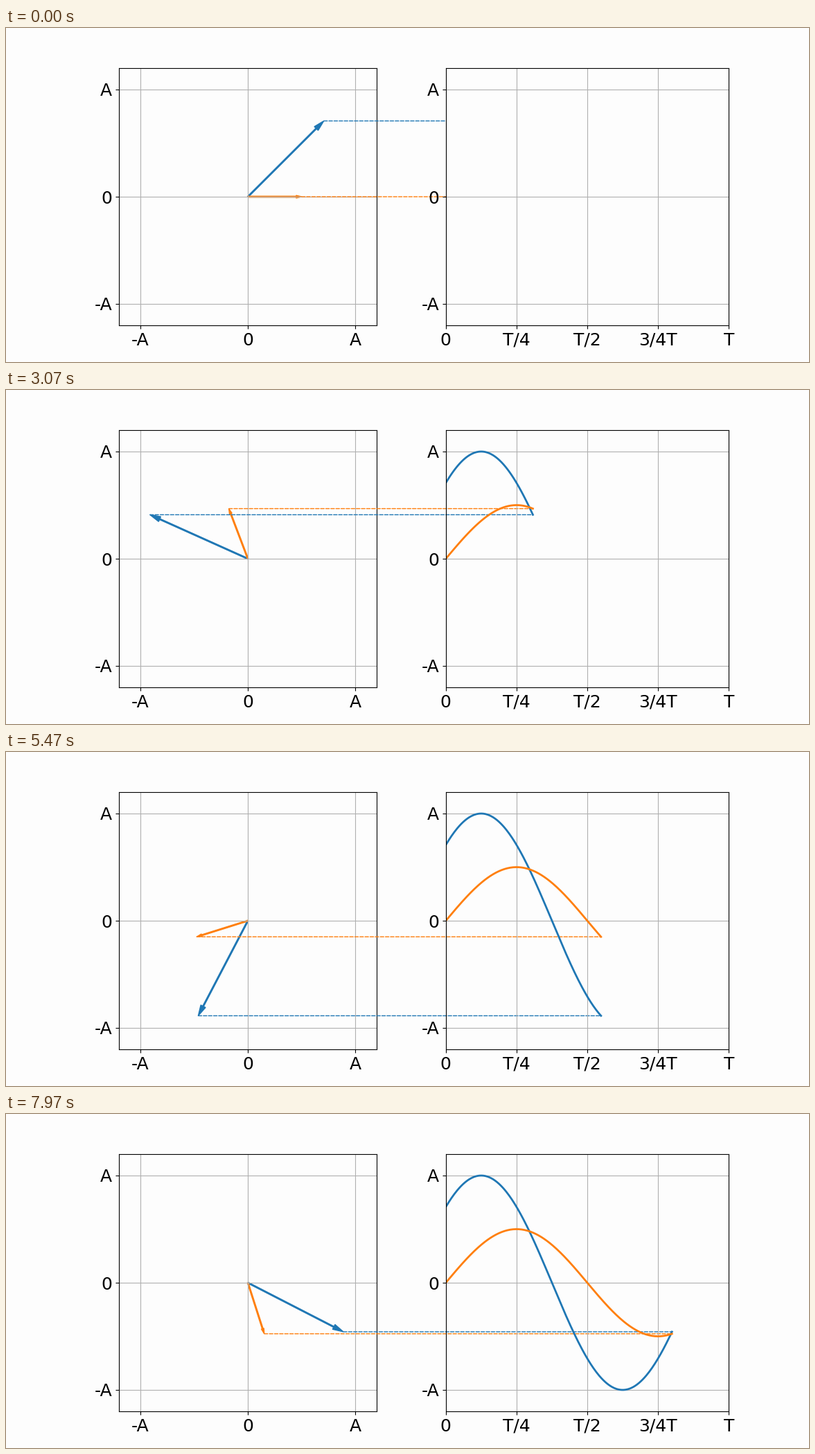
Write a matplotlib script that moves like this. It is 1159 px wide and 483 px high and loops after 8 s.

```python
import numpy as np
import matplotlib.pyplot as plt
from matplotlib.animation import FuncAnimation
from matplotlib.patches import ConnectionPatch

W, H, DPI = 1159, 483, 100
LOOP_MS, FRAMES = 8000, 240
STEPS = 300           # samples in one full period
AMP = 4.0
LIMIT = 1.2 * AMP
PAPER = "#fdfdfd"

plt.rcParams.update({"font.family": "DejaVu Sans", "font.size": 18})
fig = plt.figure(figsize=(W / DPI, H / DPI), dpi=DPI, facecolor=PAPER)


def make_axes(left, right, top=58, bottom=430):
    """Gridded axes placed by pixel edges, y counted from the top."""
    ax = fig.add_axes([left / W, 1 - bottom / H,
                       (right - left) / W, (bottom - top) / H],
                      facecolor=PAPER)
    ax.set_ylim(-LIMIT, LIMIT)
    ax.set_yticks([-AMP, 0, AMP], ["-A", "0", "A"])
    ax.grid(True)
    return ax


phase_ax = make_axes(163.1, 535.1)
phase_ax.set_xlim(-LIMIT, LIMIT)
phase_ax.set_xticks([-AMP, 0, AMP], ["-A", "0", "A"])

time_ax = make_axes(634.8, 1043.2)
time_ax.set_xlim(0, 1)
time_ax.set_xticks(np.linspace(0, 1, 5), ["0", "T/4", "T/2", "3/4T", "T"])

t = np.linspace(0, 1, STEPS)


class Phasor:
    """A rotating arrow, its trace over time and the dashed link between."""

    def __init__(self, radius, phase, color):
        angle = 2 * np.pi * t + phase
        self.x, self.y = radius * np.cos(angle), radius * np.sin(angle)
        self.arrow = phase_ax.arrow(
            0, 0, self.x[0], self.y[0], color=color, width=0.04,
            head_width=radius / 20, head_length=radius / 10,
            length_includes_head=True)
        self.trace, = time_ax.plot([], [], color=color, lw=2)
        self.link = time_ax.add_artist(ConnectionPatch(
            (self.x[0], self.y[0]), (0, self.y[0]), "data", "data",
            axesA=phase_ax, axesB=time_ax, color=color, lw=1, ls="--"))

    def show(self, k):
        x, y = self.x[k], self.y[k]
        self.arrow.set_data(dx=x, dy=y)
        self.trace.set_data(t[:k + 1], self.y[:k + 1])
        self.link.xy1, self.link.xy2 = (x, y), (t[k], y)


phasors = [Phasor(AMP, np.pi / 4, "C0"), Phasor(AMP / 2, 0, "C1")]


def update(k):
    for p in phasors:
        p.show(k)
    return []


anim = FuncAnimation(fig, update, frames=FRAMES, init_func=lambda: update(0),
                     interval=LOOP_MS / FRAMES, repeat=True, repeat_delay=0,
                     blit=False)
plt.show()
```
